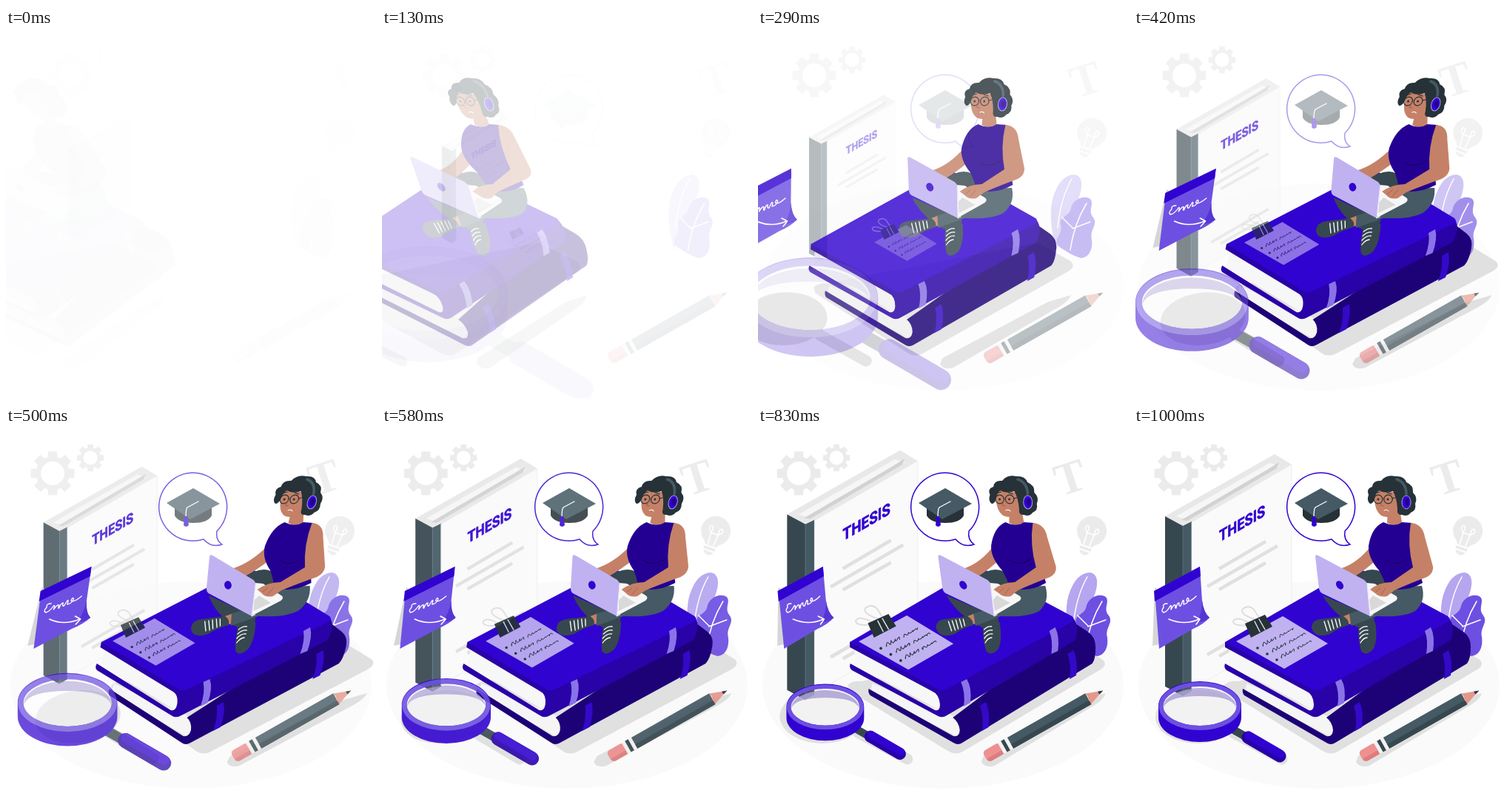
Recreate the animation shown at these times as an HTML page. Size 500 px wide and 500 px high, loop 1040 ms.

```html
<!DOCTYPE html>
<html lang="en">
<head>
<meta charset="utf-8">
<title>Thesis</title>
<style>
  html, body { margin: 0; height: 100%; overflow: hidden; background: #fff; }
  svg { display: block; width: 100vw; height: 100vh; }
  .main { fill: #3103d0; }
  .mid { fill: #6d50e2; }
  .pale { fill: #c0b2f1; }
  .ink { fill: #263238; }
  .slate { fill: #37474f; }
  .steel { fill: #455a64; }
  .skin { fill: #c58167; }
  .icon { fill: #ebebeb; }
  .shade { fill: #e0e0e0; }
  .line { fill: none; stroke-linecap: round; stroke-linejoin: round; }
  .white { stroke: #fff; }
  .dark { stroke: #263238; }
</style>
</head>
<body>
<svg viewBox="0 0 500 500">
  <ellipse data-move="fade" cx="250" cy="350" rx="244" ry="140" fill="#fafafa"/>

  <g data-move="speed" data-cy="375" class="shade">
    <path d="M122 350Q128 344 140 345L420 290L466 315Q475 322 464 329L277 439Q266 446 255 439L124 358Z"/>
    <ellipse cx="86" cy="393" rx="57" ry="36"/>
    <path d="M135 415L200 450" class="line" stroke="#e0e0e0" stroke-width="15"/>
    <path d="M303 446L440 370L470 361Q468 369 455 377L318 459Q306 463 300 454Z"/>
  </g>

  <g data-move="slide" data-x="-30">
    <path d="M422 300Q410 255 418 228Q428 198 447 198Q461 201 454 225Q448 243 438 258Z" fill="#b5a6ef"/>
    <path d="M424 270Q428 230 443 204" class="line white" stroke-width="1.5"/>
    <path class="mid" d="M424 294C418 284 432 278 428 266C425 254 440 256 442 243C445 231 460 225 468 231C474 237 464 247 472 256C479 266 467 272 470 285C472 300 466 310 456 311C445 308 435 302 424 294Z"/>
    <path d="M441 300Q446 265 463 237M444 270L430 256M444 271L468 262" class="line white" stroke-width="1.5"/>
  </g>

  <g data-move="slide" data-x="30">
    <path id="bigGear" class="icon" fill-rule="evenodd"/>
    <path id="smallGear" class="icon" fill-rule="evenodd"/>
  </g>
  <g data-move="slide" data-x="30">
    <text class="icon" transform="translate(424 70) rotate(-18)" y="20" text-anchor="middle" font-size="62" font-weight="bold" font-family="Liberation Serif, serif">T</text>
  </g>
  <g data-move="fade">
    <g transform="translate(451 142) rotate(20)">
      <path class="icon" d="M-8 21Q-9 17 -14 14A20 20 0 1 1 14 14Q9 17 8 21ZM-8 23H8V27H-8ZM-7 29H7Q5 34 0 34Q-5 34 -7 29Z"/>
      <path d="M-4 20L-5 4M4 20L5 4M-5 4Q-12 -1 -8 -5Q-3 -6 -5 4H5Q3 -6 8 -5Q12 -1 5 4" class="line white" stroke-width="1.6"/>
    </g>
  </g>

  <g data-move="zoom" data-cx="127" data-cy="203" data-from=".5">
    <path d="M42 122L190 38L213 52L78 130L66 136Z" fill="#e8e8e8"/>
    <path d="M57 122L183 50L197 54L72 127Z" fill="#f6f6f6"/>
    <path d="M64 127L180 59L196 49L193 57L72 128Z" fill="#d2d2d2"/>
    <path class="slate" d="M42 122L66 135V365L42 352Z"/>
    <path class="steel" d="M66 135L78 129V358L66 365Z"/>
    <path d="M66 135V365" stroke="#546e7a"/>
    <path d="M78 130L213 52V277L78 356Z" fill="#fafafa" stroke="#ebebeb" stroke-width=".8"/>
    <text class="main" transform="matrix(.85 -.49 0 1 115 157)" font-size="21.500" font-weight="700" stroke="#3103d0" stroke-width=".6" font-family="Roboto, sans-serif">THESIS</text>
    <path d="M115 193L178 156M99 217L194 162M115 221L178 185M99 309L194 254M115 311L178 275" fill="none" stroke="#e0e0e0" stroke-width="4.500"/>
  </g>

  <g data-move="speed" data-cy="245">
    <path d="M28 218L25 297L34 295L40 225Z" fill="#d6d6d6"/>
    <path class="mid" d="M28 223L89 190L92 236Q94 252 102 259Q94 268 80 274L34 301Z"/>
    <path d="M92 236Q94 252 102 259Q94 266 85 264Q92 254 92 236Z" fill="#5535d4"/>
    <path class="main" d="M27 223L89 190L90 203L28 237Z"/>
    <path d="M45 240Q38 240 40 245Q36 250 40 252Q45 251 49 243Q51 241 50 248Q54 240 56 242Q55 247 57 246Q58 239 61 239Q60 244 63 243L66 236Q68 234 67 241Q73 240 74 234Q72 230 71 236Q75 239 84 230" class="line white" stroke-width="1.400"/>
    <path d="M47 261Q68 270 88 261M81 257L89 261L84 268" class="line white" stroke-width="1.600"/>
  </g>

  <g data-move="fade" data-power="2">
    <path d="M267 153A46 46 0 1 1 285 142Q283 154 292 160Q277 165 267 153Z" fill="#fff" stroke="#3103d0" stroke-width="1.500"/>
    <path class="ink" d="M228 106V121Q233 131 253 131Q273 131 278 121V106Z"/>
    <path class="steel" d="M217 104L253 84L289 105L249 126Z"/>
    <path d="M260 102L245 110Q243 112 243 124" class="line white" stroke-width="1.300"/>
    <path class="main" d="M241 122H245L247 134Q243 138 240 134Z"/>
  </g>

  <g data-move="speed" data-cy="248">
    <!-- lower book -->
    <path d="M152 348L245 385Q270 394 270 405V422L150 360Z" fill="#f5f5f5"/>
    <path d="M147 355L260 419Q268 421 269 411Q268 400 260 394L430 268L445 278Q455 285 455 298Q455 315 450 321L272 428Q266 432 260 428L149 364Q146 361 147 355Z" fill="#1d0277"/>
    <g fill="#3409c8">
      <path id="ribbonShape" d="M297 378L305 373Q311 386 308 407L299 412Q302 394 297 378Z"/>
      <use href="#ribbonShape" x="120" y="-70"/>
    </g>
    <!-- upper book -->
    <path d="M129 297L236 357Q245 364 244 385L129 323Z" fill="#f7f7f7"/>
    <path d="M123 321L236 384Q243 386 243 376Q242 362 232 358L123 299V292L425 259Q431 265 431 277Q430 286 427 290L252 391Q246 395 240 392L125 330Q121 327 123 321Z" fill="#2902a8"/>
    <path class="main" d="M123 292L300 190L424 257Q429 261 424 265L252 356Q246 359 239 355Z"/>
    <g fill="#8a73e8">
      <path d="M272 346L280 342Q287 354 284 374L275 379Q278 360 272 346Z"/>
      <path d="M393 277L401 272Q407 284 404 304L395 308Q398 290 393 277Z"/>
    </g>
    <!-- reader -->
    <path class="skin" d="M322 160L331 178Q312 195 298 204L278 193Q302 186 322 160Z"/>
    <path class="slate" d="M296 205Q318 188 334 197L352 224L320 220Z"/>
    <path class="slate" d="M255 229L300 248L325 260L324 270L302 272Q270 256 255 229Z"/>
    <path class="steel" d="M336 218L389 216Q395 237 380 250Q364 259 328 257L294 270Q287 262 289 254L320 245Z"/>
    <path class="skin" d="M283 257L291 254L293 267L285 270Z"/>
    <path class="slate" d="M240 273Q240 262 252 261L283 257Q291 262 290 269Q276 273 265 281Q244 288 240 273Z"/>
    <path class="slate" d="M303 270Q315 260 326 265Q330 290 323 302Q313 312 307 304Q303 292 303 270Z"/>
    <path d="M257 264L261 277M262 263L266 276M267 262L270 274M272 261L275 272M277 261L279 270M305 275Q310 270 315 271M305 281Q310 275 316 276M305 287Q310 280 316 281M306 293Q310 286 315 286" class="line white" stroke-width="1.300"/>
    <path class="skin" d="M343 112L358 106L362 130Q352 137 342 131Z"/>
    <path d="M337 130Q352 137 362 130L376 131Q378 170 390 212Q366 226 341 218Q337 205 331 195Q316 178 317 162Q321 137 337 130Z" fill="#240092"/>
    <path d="M341 181Q356 191 371 179" class="line" stroke="#170063"/>
    <path d="M314 212L325 213L353 229Q358 232 354 236L318 257Z" fill="#f7f7f7"/>
    <path d="M318 235L323 229L341 239L320 250Z" fill="#d9d9d9"/>
    <path class="pale" d="M245 176Q245 173 249 175L311 208Q314 210 315 214L319 257L254 226Q251 224 250 220Z"/>
    <path d="M315 214L319 257L323 255" class="line" stroke="#e8e3fb"/>
    <ellipse class="main" cx="278" cy="215" rx="4.500" ry="6.200" transform="rotate(-35 278 215)"/>
    <path class="skin" d="M374 131Q390 132 393 150L404 190Q405 199 396 204Q372 213 352 222L342 230Q332 232 326 226L319 221Q331 211 348 211L377 191Q369 160 374 131Z"/>
    <path d="M333 219L327 224M340 219L334 228" class="line" stroke="#9c5f4a" stroke-width=".8"/>
    <path class="skin" d="M326 84Q322 112 334 121Q346 127 358 116L364 92Z"/>
    <path class="ink" d="M319 105Q314 101 317 93Q313 85 322 82Q323 73 334 74Q341 65 353 68Q365 67 368 76Q378 80 377 90Q384 97 380 105Q382 114 374 117Q370 123 362 120Q355 121 356 112Q355 97 350 88Q339 92 331 87Q326 91 325 99Q323 105 319 105Z"/>
    <g class="line dark" stroke-width="1.200">
      <circle cx="330" cy="99" r="5.800"/>
      <circle cx="343.500" cy="99" r="5.800"/>
      <path d="M349 98L357 96M326 91L332 89M342 90L348 92"/>
    </g>
    <circle class="ink" cx="330" cy="99" r="1.500"/>
    <circle class="ink" cx="343" cy="99" r="1.500"/>
    <path d="M336 101L333 107L337 108" class="line" stroke="#9c5f4a"/>
    <path d="M338 114Q342 112 344 115" class="line white"/>
    <path d="M355 72Q369 77 368 95" class="line" stroke="#455a64" stroke-width="3.500"/>
    <ellipse class="ink" cx="370" cy="103" rx="7" ry="10.500"/>
    <ellipse cx="368" cy="103" rx="6" ry="9" class="main" stroke="#a999ee"/>
    <ellipse cx="369" cy="103" rx="3" ry="5" fill="#240092"/>
  </g>

  <g data-move="zoom" data-cx="198" data-cy="286" data-from=".5">
    <path class="pale" d="M138 291L201 257L262 294L203 328Z"/>
    <circle class="ink" cx="167" cy="300" r="1.800"/>
    <circle class="ink" cx="180" cy="308" r="1.800"/>
    <circle class="ink" cx="193" cy="316" r="1.800"/>
    <g id="notes" class="line dark"></g>
    <path d="M155 269Q134 271 134 264Q137 257 152 264L160 270M166 262Q142 255 147 247Q155 241 162 248L171 262" class="line" stroke="#dedede" stroke-width="2"/>
    <path class="ink" d="M150 267L177 255L187 271L158 286Z"/>
    <path d="M163 264L170 278M169 261L177 275" class="line" stroke="#dedede" stroke-width="1.500"/>
  </g>

  <g data-move="fade">
    <g transform="translate(308 447) rotate(-29.5)">
      <rect x="-1" y="-8.500" width="26" height="17" rx="5" fill="#ee9090"/>
      <path d="M4 8.500H24V3H0Q0 7 4 8.500Z" fill="#dd7d7d"/>
      <path d="M23 -8.500H38V8.500H23Z" fill="#f2f2f2"/>
      <path class="slate" d="M28 -8.500H33V8.500H28Z"/>
      <path class="steel" d="M38 -8.500H159V8.500H38Z"/>
      <path class="slate" d="M38 2H159V8.500H38Z"/>
      <path d="M158 -8.500L181 0L158 8.500Q161 5 158 2Q162 -3 158 -8.500Z" fill="#e4988a"/>
      <path class="ink" d="M175 -2.300L182 0L175 2.300Z"/>
    </g>
  </g>

  <g data-move="zoom" data-cx="118" data-cy="400" data-from="2" data-power="1.5">
    <path d="M130 408L153 421" stroke="#37474f" stroke-width="11"/>
    <path d="M154 421L197 446" class="line" stroke="#2702a6" stroke-width="17"/>
    <path d="M155 418L198 443" class="line" stroke="#3103d0" stroke-width="11"/>
    <ellipse cx="89" cy="381" rx="50" ry="26" fill="#fff" opacity=".6"/>
    <path d="M40 380A49 26 0 0 1 138 380Q132 365 89 365Q46 365 40 380Z" fill="#8f80c8" opacity=".6"/>
    <path class="main" fill-rule="evenodd" d="M33 378A56 33 0 0 1 145 378V394A56 33 0 0 1 33 394ZM39 378A50 27 0 0 0 139 378A50 27 0 0 0 39 378Z"/>
    <ellipse cx="89" cy="378.500" rx="52.500" ry="29.500" fill="none" stroke="#6d50e2" stroke-width="6"/>
  </g>
</svg>
<script>
const LOOP = 1040, STEP = 41.6, LEAD = 29;
const $ = id => document.getElementById(id);
const mix = (a, b, p) => a + (b - a) * p;

// cubic-bezier(.36, -.01, .5, 1.38), solved by bisection
function ease(x) {
  if (x <= 0) return 0;
  if (x >= 1) return 1;
  const curve = (a, b, s) => 3 * a * s * (1 - s) ** 2 + 3 * b * s * s * (1 - s) + s ** 3;
  let lo = 0, hi = 1;
  for (let i = 0; i < 30; i++) {
    const s = (lo + hi) / 2;
    if (curve(.36, .5, s) < x) lo = s; else hi = s;
  }
  return curve(-.01, 1.38, lo);
}

// Each move maps progress 0..1 to [transform, opacity].
const moves = {
  fade: x => ['', ease(x)],
  slide: (x, d) => [`translate(${d.x * (1 - ease(x))} 0)`, ease(x)],
  zoom(x, { cx, cy, from }) {
    const p = ease(x);
    return [`translate(${cx} ${cy}) scale(${mix(+from, 1, p)}) translate(${-cx} ${-cy})`, p];
  },
  speed(x, { cy }) {
    let shift = 0, angle, alpha = 1;
    if (x < .6) {
      alpha = ease(x / .6);
      shift = mix(-250, 0, alpha);
      angle = mix(20, -10, alpha);
    } else if (x < .8) angle = mix(-10, 2, ease((x - .6) / .2));
    else angle = mix(2, 0, ease((x - .8) / .2));
    return [`translate(${shift} ${cy}) skewX(${angle}) translate(0 ${-cy})`, alpha];
  }
};

function gear(cx, cy, r, hole) {
  const points = [];
  for (let i = 0; i < 8; i++)
    for (const [turn, k] of [[-.29, .76], [-.2, 1], [.2, 1], [.29, .76]]) {
      const a = i * Math.PI / 4 + turn;
      points.push(`${cx + r * k * Math.cos(a)} ${cy + r * k * Math.sin(a)}`);
    }
  const arc = `a${hole} ${hole} 0 0 1 `;
  return `M${points.join('L')}ZM${cx - hole} ${cy}${arc}${2 * hole} 0${arc}${-2 * hole} 0Z`;
}

// A handwritten row: two wavy words running up the slope.
function scribble(x, y, length) {
  let d = '';
  for (let u = 0; u <= length; u++) {
    const gap = Math.abs(u - length * .5) < 2;
    const wave = u < length * .55 ? 2.2 : 1.2;
    d += `${u && !gap ? 'L' : 'M'}${x + u + Math.cos(u * 1.1)} ${y - u * .52 + wave * Math.sin(u * 1.4)}`;
  }
  return `<path d="${d}"/>`;
}

$('bigGear').setAttribute('d', gear(57, 64, 30, 16));
$('smallGear').setAttribute('d', gear(108, 43, 18.5, 9.5));
$('notes').innerHTML = scribble(173, 296, 43) + scribble(186, 304, 45) + scribble(198, 312, 42);

const parts = [...document.querySelectorAll('[data-move]')];
const start = performance.now();

function draw() {
  const t = (performance.now() - start) % LOOP;
  const tick = Math.floor((t + 3) / STEP) % 25;
  const x = Math.min(1, (tick * 1000 / 24 + LEAD) / 1000);
  for (const part of parts) {
    const { move, power = 1 } = part.dataset;
    const [transform, alpha] = moves[move](x, part.dataset);
    part.setAttribute('transform', transform);
    part.setAttribute('opacity', Math.max(0, Math.min(1, alpha)) ** power);
  }
  requestAnimationFrame(draw);
}
draw();
</script>
</body>
</html>
```
